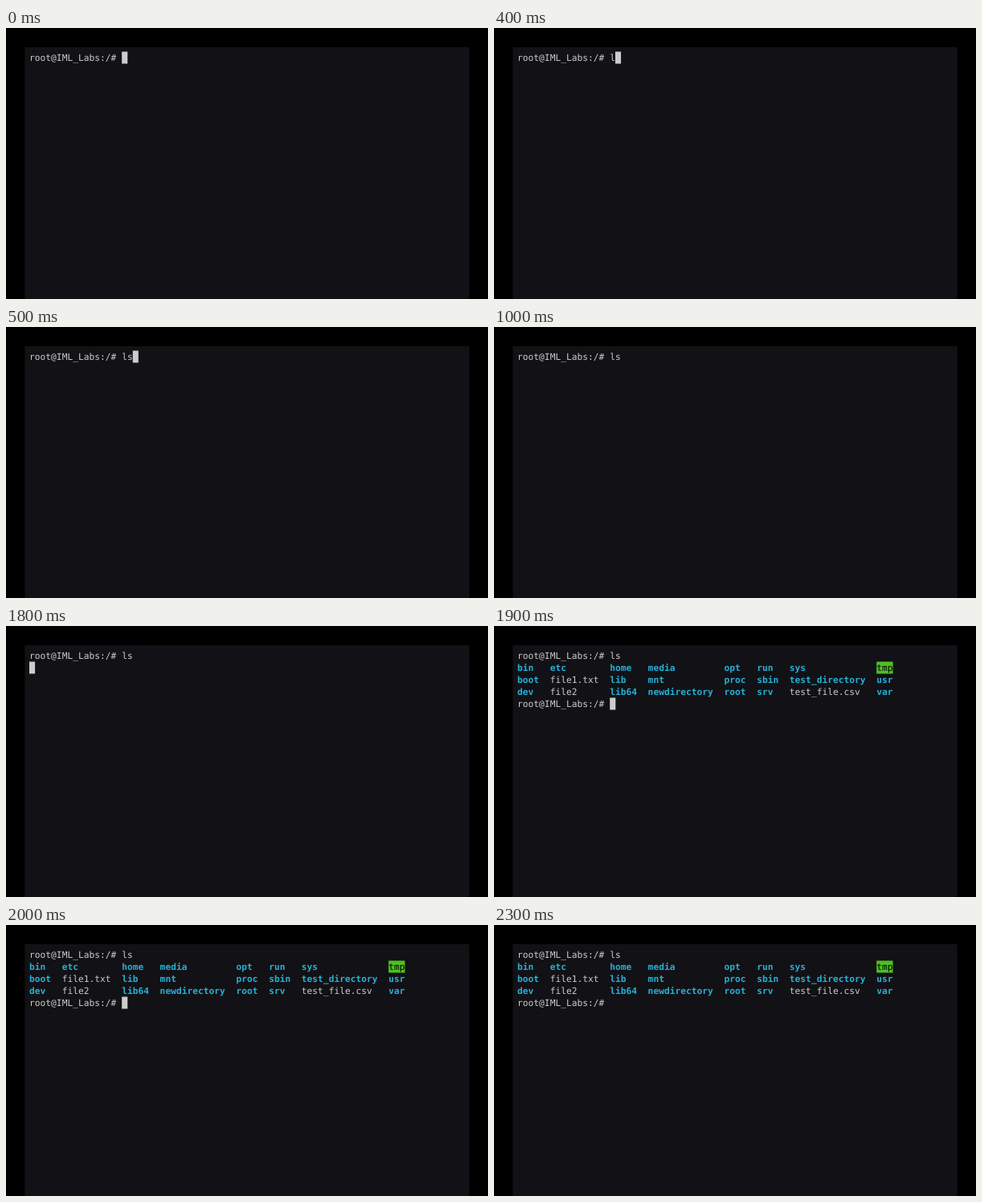
Animation of 600 by 338 pixels, one loop 2.5 s. Source, as an HTML page:

```html
<!DOCTYPE html>
<html lang="en">
<head>
<meta charset="utf-8">
<title>Terminal</title>
<style>
  html, body { margin: 0; width: 100%; height: 100%; overflow: hidden; background: #000; }
  svg { display: block; width: 100%; height: 100%; }
  text {
    font: 11.255px "DejaVu Sans Mono", monospace;
    text-rendering: geometricPrecision;
    white-space: pre;
    fill: #ccc;
  }
  .dir { font-weight: bold; fill: #26b0d7; }
  .open { fill: #000; }
</style>
</head>
<body>
<svg viewBox="0 0 600 338">
  <rect x="23.4" y="24" width="553.2" height="314" fill="#121115"/>
  <g id="screen"></g>
  <rect id="cursor" width="7.1" height="15" fill="#ccc"/>
</svg>
<script>
const LOOP = 2500;
const CELL = 6.776, LINE = 15, LEFT = 29, TOP = 29.5, BASELINE = 11.4;
const PROMPT = "root@IML_Labs:/# ";
const COLUMNS = [0, 6, 17, 24, 38, 44, 50, 66];
const LISTING = [
  "bin etc home media opt run sys tmp",
  "boot file1.txt lib mnt proc sbin test_directory usr",
  "dev file2 lib64 newdirectory root srv test_file.csv var",
];

const screen = document.getElementById("screen");
const cursor = document.getElementById("cursor");
const cellX = col => LEFT + col * CELL;
const cellY = row => TOP + row * LINE;

function add(parent, tag, attributes) {
  const node = document.createElementNS("http://www.w3.org/2000/svg", tag);
  for (const name in attributes) node.setAttribute(name, attributes[name]);
  return parent.appendChild(node);
}

function write(parent, row, col, string, kind = "") {
  const node = add(parent, "text", { x: cellX(col), y: cellY(row) + BASELINE, class: kind });
  node.textContent = string;
  return node;
}

const command = write(screen, 0, 0, PROMPT);
const output = add(screen, "g");

LISTING.forEach((line, i) => line.split(" ").forEach((name, j) => {
  const row = i + 1, col = COLUMNS[j];
  const open = name === "tmp";
  if (open) {
    add(output, "rect", {
      x: cellX(col), y: cellY(row), width: 3 * CELL, height: LINE, fill: "#4ebf22",
    });
  }
  const kind = open ? "open" : /^file|\./.test(name) ? "" : "dir";
  write(output, row, col, name, kind);
}));
write(output, 4, 0, PROMPT);

function draw(t) {
  const typed = t < 400 ? 0 : t < 500 ? 1 : 2;
  const listed = t >= 1900;
  const [row, col] = listed ? [4, PROMPT.length]
    : t >= 1800 ? [1, 0]
    : [0, PROMPT.length + typed];
  const blinkedOff = (t >= 1000 && t < 1500) || t >= 2300;

  command.textContent = PROMPT + "ls".slice(0, typed);
  output.style.display = listed ? "" : "none";
  cursor.style.display = blinkedOff ? "none" : "";
  cursor.setAttribute("x", cellX(col));
  cursor.setAttribute("y", cellY(row));
}

const start = performance.now();
function tick() {
  draw((performance.now() - start) % LOOP);
  requestAnimationFrame(tick);
}
tick();
</script>
</body>
</html>
```
